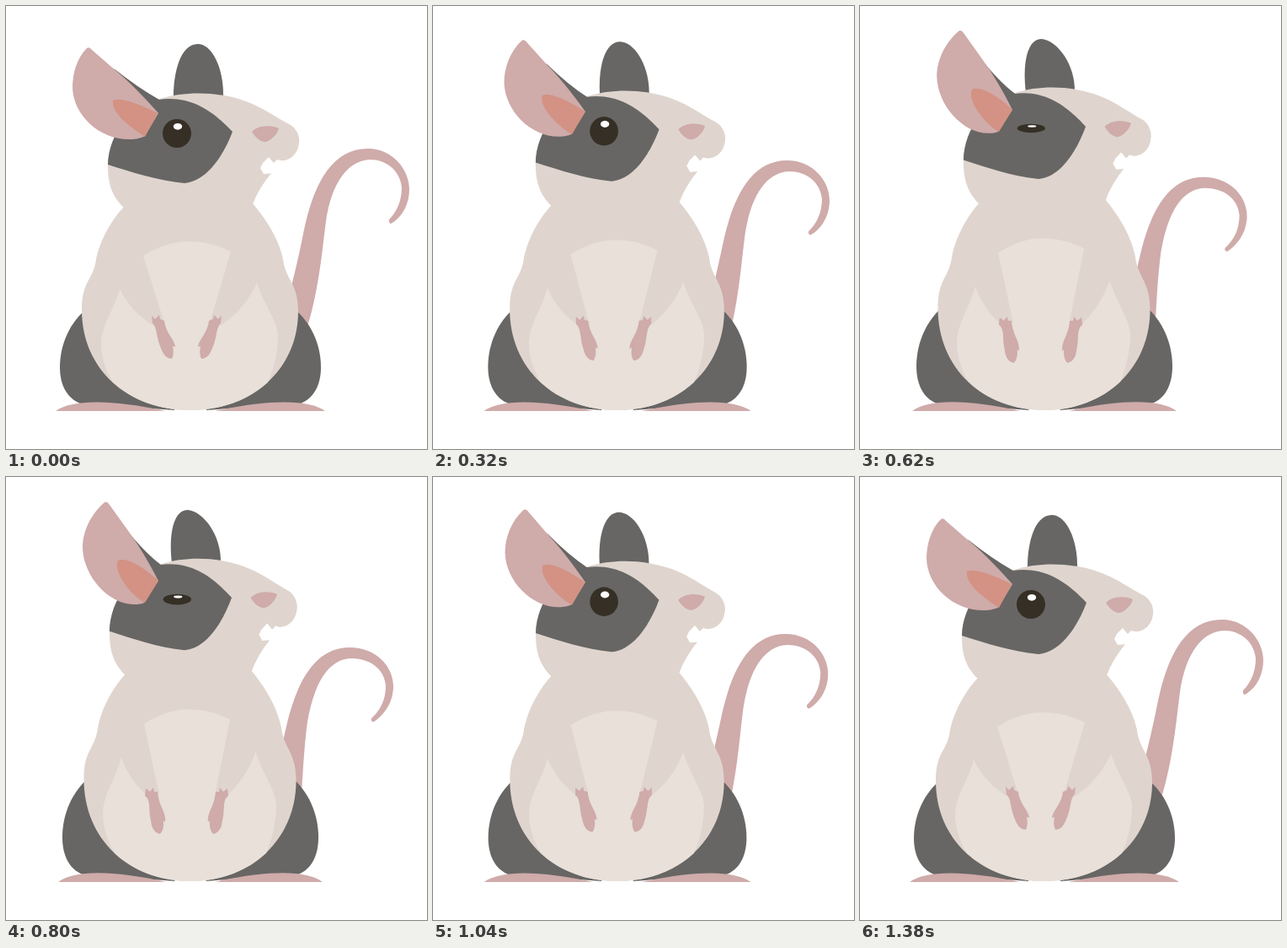
Recreate the animation shown at these times as an HTML page. Size 500 by 525 pixels, loop 1400 ms.

```html
<!DOCTYPE html>
<html lang="en">
<head>
<meta charset="utf-8">
<title>Breathing rat</title>
<style>
  html, body { margin: 0; width: 100%; height: 100%; overflow: hidden; background: #fff; }
  svg { display: block; width: 100vw; height: 100vh; }
  .dark { fill: #676664; }
  .fur { fill: #dfd5ce; }
  .light { fill: #e8e0d9; }
  .pink { fill: #cfabaa; }
  .inner { fill: #d39283; }
  .white { fill: #fff; }
</style>
</head>
<body>
<svg viewBox="0 0 500 525" xmlns="http://www.w3.org/2000/svg">
  <defs>
    <path id="leg" d="M97 358C76 374 64 401 64 428C64 450 73 465 88 471L200 479V358Z"/>
    <path id="foot" d="M59 480C78 466 125 466 190 480Z"/>
    <path id="hand"/>
  </defs>
  <path id="tail" class="pink"/>
  <path id="backEar" class="dark"/>
  <g class="squash">
    <g class="dark">
      <use href="#leg"/>
      <use href="#leg" transform="translate(438 0) scale(-1 1)"/>
    </g>
    <g class="pink">
      <use href="#foot"/>
      <use href="#foot" transform="translate(438 0) scale(-1 1)"/>
    </g>
    <path class="fur" d="M140 238C123 256 111 280 107 300C104 325 90 325 90 360C90 430 144 479 219 479
      C293 479 347 430 347 362C347 328 332 325 329 300C325 280 312 256 293 234Z"/>
    <path id="belly" class="light"/>
    <path class="fur" d="M140 239C124 224 121 207 121 189C122 150 150 118 183 110C215 100 255 102 285 113
      C305 120 322 133 338 141C347 147 349 157 348 162C347 176 336 185 323 183L316 197Q300 216 293 235L219 262Z"/>
    <path class="dark" d="M121 188C122 150 150 118 181 111C222 105 249 128 269 149C258 178 238 208 212 210C180 207 150 197 121 188Z"/>
    <path class="pink" d="M292 149C300 141 315 141 324 145C322 153 313 161 307 161C300 160 295 154 292 149Z"/>
    <path class="white" d="M302 192L305 186L312 179L318 186L322 182L330 184L318 198L306 199Z"/>
    <g id="eye">
      <circle cx="203" cy="151" r="17" fill="#352f26"/>
      <ellipse class="white" cx="204" cy="142.8" rx="5.2" ry="3.9"/>
    </g>
  </g>
  <path id="earBack" class="dark"/>
  <path id="ear" class="pink"/>
  <path id="earInner" class="inner"/>
  <g class="pink">
    <use href="#hand"/>
    <use href="#hand" transform="translate(429 0) scale(-1 1)"/>
  </g>
</svg>
<script>
const LOOP = 1400;
const $ = id => document.getElementById(id);

// Each shape has a resting pose and an inhaled pose with the same commands.
const poses = {
  tail: [
    'M333 355C345 310 350 285 354 265C365 215 385 169 430 169C460 169 479 195 479 217C479 238 468 252 457 258Q454 257 455 253C464 244 470 231 470 215C468 195 452 182 432 182C400 184 385 220 380 255C376 285 372 335 358 380Z',
    'M322 350C328 315 332 300 335 287C348 237 370 202 408 202C440 202 460 225 460 248C460 268 448 283 437 290Q433 290 434 286C444 277 451 265 451 247C449 227 432 215 410 215C378 216 364 255 358 290C354 320 353 345 351 375Z'
  ],
  backEar: [
    'M199 112C198 85 205 45 228 45C245 45 259 75 258 108Z',
    'M198 109C193 80 195 39 216 39C235 41 256 70 255 102Z'
  ],
  earBack: [
    'M128 74Q157 97 182 111L192 128L172 135Z',
    'M141 60Q165 90 184 104L192 122L172 130Z'
  ],
  ear: [
    'M96 50C84 62 79 80 79 97C80 130 112 160 150 158Q160 157 165 154L181 127Q148 90 125 72L102 52Q99 48 96 50Z',
    'M117 30C101 44 91 64 91 84C92 118 122 151 152 151Q160 151 164 149L181 123Q163 88 146 65L123 33Q120 28 117 30Z'
  ],
  earInner: [
    'M127 112C135 107 160 117 180 127L165 155C150 145 125 128 127 112Z',
    'M133 99C143 94 165 108 181 123L165 149C150 142 126 112 133 99Z'
  ],
  belly: [
    'M163 296Q190 279 217 279Q243 279 267 291L242 376L256 378Q285 358 298 328C308 358 324 375 323 393C322 416 317 432 311 446C288 467 256 479 219 479C182 479 150 467 127 446C118 432 113 415 113 400C114 375 130 358 135 335Q148 362 174 378L188 376Z',
    'M163 296Q190 279 217 279Q243 279 267 291L249 377L265 378Q287 358 298 328C308 358 324 375 323 393C322 416 317 432 311 446C288 467 256 479 219 479C182 479 150 467 127 446C118 432 113 415 113 400C114 375 130 358 135 335Q146 362 165 378L181 377Z'
  ],
  hand: [
    'M173 367L177 371L182 366L183 371L188 373Q189 382 195 391Q201 400 201 404L198 403Q200 412 197 418Q190 418 186 410Q181 400 179 388Q178 380 174 376Z',
    'M166 369L171 373L175 368L176 373L180 373Q181 384 186 394Q190 403 189 409L187 407Q188 418 183 423Q176 422 173 413Q170 400 170 388Q169 380 165 378Z'
  ]
};

const NUM = /\d+(\.\d+)?/g;
const shapes = Object.entries(poses).map(([id, [a, b]]) => ({
  el: $(id), a, ends: b.match(NUM).map(Number)
}));

function morph({ el, a, ends }, k) {
  let i = 0;
  el.setAttribute('d', a.replace(NUM, n => (+n + (ends[i++] - n) * k).toFixed(2)));
}

const scaleAbout = (x, y, sx, sy) =>
  `translate(${x} ${y}) scale(${sx} ${sy}) translate(${-x} ${-y})`;

const squash = document.querySelector('.squash');

function draw(ms) {
  const t = ms % LOOP;
  const breath = (1 - Math.cos(2 * Math.PI * t / LOOP)) / 2;
  const k = breath / 0.95;
  for (const s of shapes) morph(s, s.el.id === 'tail' ? k ** 1.1 : k);
  squash.setAttribute('transform', scaleAbout(219, 480, 1 - 0.02 * breath, 1 + 0.019 * breath));

  // Blink: linear close and open around mid-loop.
  const shut = Math.max(0, 1 - Math.abs(t - LOOP / 2) / 300);
  $('eye').setAttribute('transform', scaleAbout(203, 151, 1, 1 - 0.95 * shut));
}

const start = performance.now();
function tick() {
  draw(performance.now() - start);
  requestAnimationFrame(tick);
}
draw(0);
requestAnimationFrame(tick);
</script>
</body>
</html>
```
